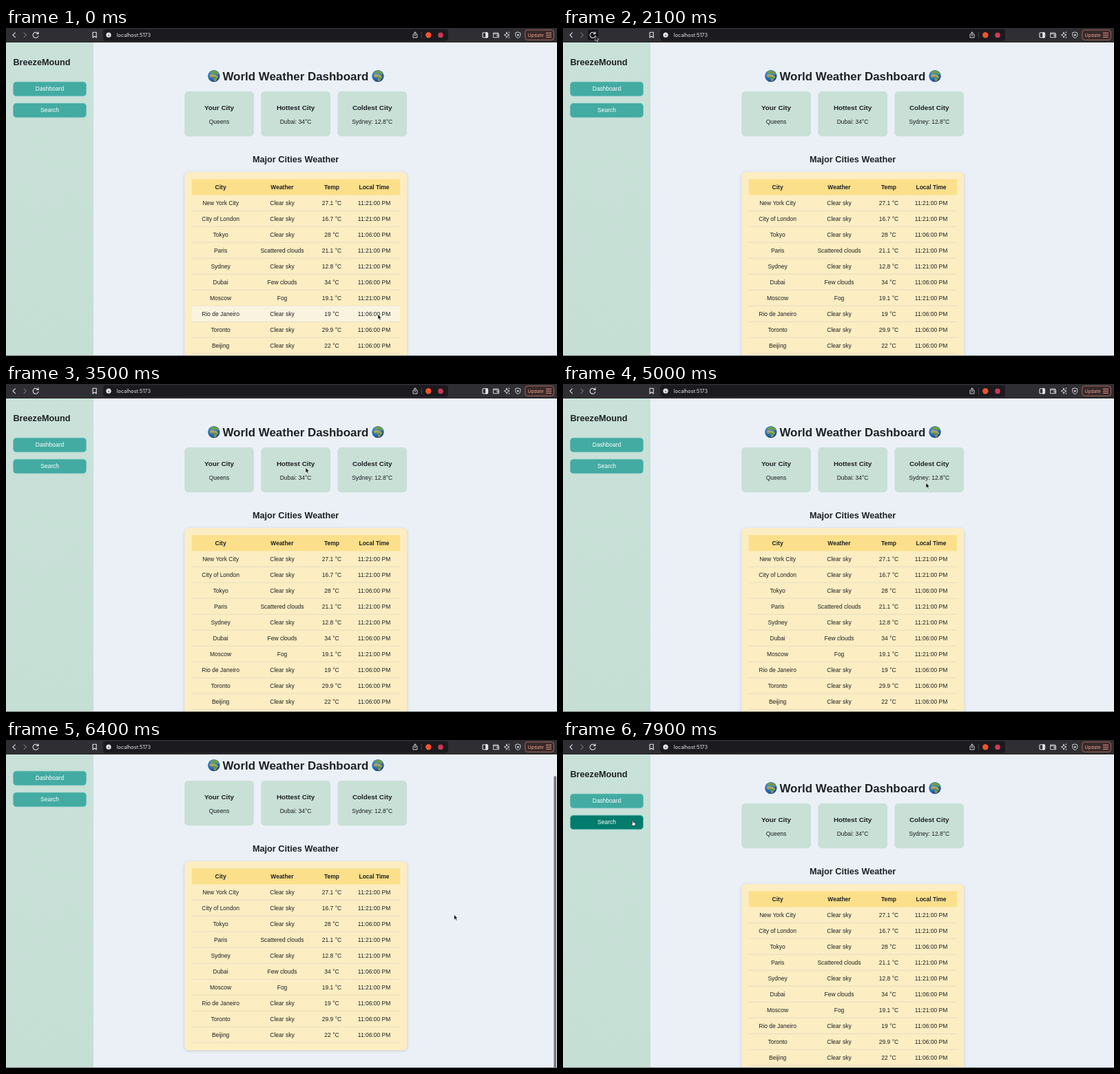
An HTML page for the animation above (8 s loop, 800 by 476 pixels).

```html
<!DOCTYPE html>
<html lang="en">
<head>
<meta charset="utf-8">
<title>Weather dashboard</title>
<style>
  html, body { margin: 0; width: 100%; height: 100%; overflow: hidden; background: #ebf0f7; }
  svg { display: block; width: 800px; height: 476px; }
  text { font-family: "Liberation Sans", Arial, sans-serif; font-size: 8.47px; fill: #1d2124; }
  .mid { text-anchor: middle; }
  .bold { font-weight: 700; }
  .h1 { font-size: 16.93px; }
  .h2 { font-size: 12.7px; }
  .h3 { font-size: 9.9px; }
  .white { fill: #fff; }
  .ui { font-family: Inter, sans-serif; font-size: 7.3px; fill: #e6e6e8; }
  .card { fill: #c8e0d6; }
  .button { fill: #43aba2; }
  .button.hover { fill: #047c6d; }
  .row { fill: none; }
  .row.hover { fill: #faf3df; }
  .icon { fill: none; stroke: #e4e4e7; stroke-width: 1.1; stroke-linecap: round; stroke-linejoin: round; }
  .soft { filter: drop-shadow(0 1px 2px rgba(60, 70, 80, .22)); }
</style>
</head>
<body>
<svg viewBox="0 0 800 476">
  <defs>
    <linearGradient id="side" x1="0" y1="0" x2="0" y2="1">
      <stop offset="0" stop-color="#c9e1d8"/>
      <stop offset="1" stop-color="#c6dfd5"/>
    </linearGradient>
    <radialGradient id="sea" cx=".4" cy=".3" r=".75">
      <stop offset="0" stop-color="#4f9bdc"/>
      <stop offset=".65" stop-color="#2768ae"/>
      <stop offset="1" stop-color="#173b73"/>
    </radialGradient>
    <g id="globe">
      <circle r="8.7" fill="url(#sea)"/>
      <path fill="#6d9b4b" d="M-4.8-5.6-2-7.6 2.5-7.9 6-5.8 7.6-2.8 5.8-2.2 3.4-3.4 1.4-2.6-.4-3.8-2.4-2.8-4.6-3Z"/>
      <path fill="#b5a65a" d="M-5.4-1.9-2.2-2.4.8-1.4 3.6-1.5 5 1 6.6 1.3 4.4 3.6 3.6 6 1.8 7.6.4 6.6-.2 3.4-1.4 2.2-4.2 2.2-6 .4Z"/>
      <path fill="#5f9143" d="M-4.4 1.2 0 .7 4.4 1.8 3.6 4.6 1.6 6.2.2 4 -1 2.2-4 2.2Z"/>
    </g>
  </defs>

  <rect width="800" height="476" fill="#ebf0f7"/>
  <rect y="21" width="127" height="455" fill="url(#side)"/>

  <g id="page">
    <text class="bold h2" x="10.4" y="54">BreezeMound</text>
    <text class="bold h1 mid" x="420.4" y="76">World Weather Dashboard</text>
    <use href="#globe" x="301.8" y="69.6"/>
    <use href="#globe" x="540" y="69.6"/>
    <text class="bold h2 mid" x="420.6" y="195.4">Major Cities Weather</text>
    <rect class="soft" x="259.2" y="209" width="323" height="274.3" rx="6.5" fill="#fcedc2"/>
    <rect x="269.7" y="219.4" width="302.3" height="23" fill="#fcdf8a"/>
  </g>

  <rect id="thumb" x="795.4" width="3.6" height="424" rx="1.8" fill="#77797d"/>
  <rect y="475" width="800" height="1" fill="#6d7274"/>

  <rect width="800" height="21" fill="#2f2e33"/>
  <rect y="20.2" width="800" height=".8" fill="#242328"/>
  <rect x="141" y="1.8" width="501" height="17" rx="4" fill="#1b1a1f"/>
  <rect id="reloadBg" x="36" y="2.6" width="15" height="15" rx="3" fill="#151418"/>
  <g class="icon">
    <path d="M13.4 6.8 10 10.2 13.4 13.6"/>
    <path stroke="#737278" d="M26 6.8 29.4 10.2 26 13.6"/>
    <path d="M46.5 8.1A4 4 0 1 0 47 11.3M47 5.8V8.5H44.2"/>
    <path d="M126 6.2H131.2V14L128.6 11.9 126 14Z"/>
    <path d="M592.5 9H591V14H597V9H595.5M594 11.6V6M592.3 7.5 594 5.8 595.7 7.5" stroke-width=".9"/>
    <path d="M603.3 6V14.5" stroke="#55545a" stroke-width=".8"/>
    <rect x="692" y="6.7" width="7.6" height="7" rx="1"/>
    <path d="M697.7 7.2V13.2" stroke-width="3"/>
    <path d="M708 7H714.5V8.5H715.6V13.7H708ZM708 8.6H714.5M715.6 10.2H713V12H715.6" stroke-width=".9"/>
    <path d="M727 6.2 728.1 9 731 10.2 728.1 11.4 727 14.2 725.9 11.4 723.2 10.2 725.9 9ZM730.3 5.7V7.4M730.4 13V14.5" stroke-width=".9"/>
    <path d="M743.3 6 746.8 7.1V10.2C746.8 12.4 745.2 13.8 743.3 14.6 741.4 13.8 739.8 12.4 739.8 10.2V7.1Z" stroke-width=".9"/>
    <path d="M743.3 9V11.5M742 10.2H744.6" stroke-width="1"/>
  </g>
  <circle cx="149" cy="10.2" r="3.6" fill="#e6e6e8"/>
  <path d="M149 9.8V12M149 8.2V8.5" stroke="#1b1a1f" stroke-width="1"/>
  <text class="ui" x="160.8" y="12.8">localhost:5173</text>
  <circle cx="613.3" cy="10.2" r="4.2" fill="#f0532d"/>
  <circle cx="631" cy="10.4" r="3.8" fill="#c73a55"/>
  <rect x="753.8" y="2.9" width="41.6" height="14.4" rx="3.5" fill="#37292a" stroke="#b9705f" stroke-width=".9"/>
  <text class="ui" x="757.4" y="12.7" style="font-size:6.8px;fill:#f2a08e">Update</text>
  <path d="M784 7.2H792M784 10.2H792M784 13.2H792" stroke="#f2a08e" stroke-width="1"/>

  <g id="cursor">
    <path id="arrow" d="M0 0V7.3L1.7 5.8 2.9 8.5 4.2 7.9 3 5.3H5.2Z" fill="#000" stroke="#fff" stroke-width=".6"/>
    <path id="hand" d="M-.9 0Q0-.8.7 0L1.1 2.6 3.8 3.2Q4.6 3.6 4.3 5L3.6 7.4H.2L-1.9 4.8Q-2.1 3.9-1.1 4.1L-.4 4.6Z" fill="#fff" stroke="#111" stroke-width=".7"/>
  </g>
</svg>
<script>
const $ = id => document.getElementById(id);
const page = $("page");

function add(tag, attrs, text) {
  const el = document.createElementNS("http://www.w3.org/2000/svg", tag);
  for (const k in attrs) el.setAttribute(k, attrs[k]);
  if (text) el.textContent = text;
  return page.appendChild(el);
}
const label = (text, x, y, cls = "") => add("text", { x, y, class: "mid " + cls }, text);

const buttons = ["Dashboard", "Search"].map((name, i) => {
  const y = 78.2 + 31 * i;
  const el = add("rect", { x: 10.5, y, width: 106, height: 20.6, rx: 4.5, class: "button", stroke: "#69c3c0", "stroke-width": .6 });
  label(name, 63.5, y + 13.1, "white");
  return { el, x: 10, y, w: 107, h: 21 };
});

[["Your City", "Queens"], ["Hottest City", "Dubai: 34°C"], ["Coldest City", "Sydney: 12.8°C"]].forEach(([title, value], i) => {
  const x = 259.2 + 111.1 * i;
  add("rect", { x, y: 92, width: 100.7, height: 65.2, rx: 5.5, class: "card" });
  label(title, x + 50.3, 118.9, "bold h3");
  label(value, x + 50.3, 138.7);
});

const columns = [311.6, 401, 473, 534.5];
const writeRow = (cells, y, cls) => cells.forEach((c, i) => label(c, columns[i], y, cls));
writeRow(["City", "Weather", "Temp", "Local Time"], 233.7, "bold");

const rows = [
  ["New York City", "Clear sky", 27.1, 21],
  ["City of London", "Clear sky", 16.7, 21],
  ["Tokyo", "Clear sky", 28, 6],
  ["Paris", "Scattered clouds", 21.1, 21],
  ["Sydney", "Clear sky", 12.8, 21],
  ["Dubai", "Few clouds", 34, 6],
  ["Moscow", "Fog", 19.1, 21],
  ["Rio de Janeiro", "Clear sky", 19, 6],
  ["Toronto", "Clear sky", 29.9, 6],
  ["Beijing", "Clear sky", 22, 6]
].map(([city, sky, temp, min], i) => {
  const y = 242.4 + 23 * i;
  const el = add("rect", { x: 269.7, y, width: 302.3, height: 23, class: "row" });
  add("rect", { x: 269.7, y: y + 22.4, width: 302.3, height: .7, fill: "#dcd7c4" });
  writeRow([city, sky, temp + " °C", `11:${String(min).padStart(2, "0")}:00 PM`], y + 14.3);
  return { el, x: 269, y, w: 303, h: 23 };
});

// [time, value...] keys
const pointer = [
  [0, 540, 415.5], [500, 540, 415.5], [1700, 46.8, 11.5], [2400, 46.8, 11.5],
  [3000, 312, 128], [3500, 435, 121.5], [4200, 436, 128], [4800, 527, 143.5],
  [5100, 527, 143.5], [5500, 654, 253.5], [6300, 654, 253.5], [6600, 641, 253.5],
  [7100, 641, 253.5], [7700, 101, 117]
];
const scrolling = [[5400, 0], [5700, 33], [6500, 33], [6800, 11], [7000, 0]];
const barFade = [[5400, 0], [5500, 1], [7300, 1], [7600, 0]];

function sample(keys, t) {
  const i = keys.findIndex(k => k[0] > t);
  if (i < 0) return keys[keys.length - 1].slice(1);
  if (!i) return keys[0].slice(1);
  const a = keys[i - 1], b = keys[i];
  const u = (t - a[0]) / (b[0] - a[0]), e = u * u * (3 - 2 * u);
  return a.slice(1).map((v, j) => v + (b[j + 1] - v) * e);
}

const LOOP = 8000, STEP = 100;
const inside = (r, x, y) => x >= r.x && x < r.x + r.w && y >= r.y && y < r.y + r.h;
const show = (el, on) => el.setAttribute("opacity", +on);

function draw(now) {
  const t = Math.floor(now % LOOP / STEP) * STEP;
  const [x, y] = sample(pointer, t);
  const [scroll] = sample(scrolling, t);
  let onButton = false;

  page.setAttribute("transform", `translate(0 ${-scroll})`);
  $("thumb").setAttribute("y", 21.8 + scroll * .92);
  show($("thumb"), sample(barFade, t)[0]);

  for (const r of rows) r.el.classList.toggle("hover", y > 21 && inside(r, x, y + scroll));
  for (const b of buttons) {
    const over = y > 21 && inside(b, x, y + scroll);
    b.el.classList.toggle("hover", over);
    onButton = onButton || over;
  }
  show($("reloadBg"), x > 36 && x < 51 && y < 18);
  show($("arrow"), !onButton);
  show($("hand"), onButton);
  $("cursor").setAttribute("transform", `translate(${x} ${y})`);
}

const start = performance.now();
function tick() {
  draw(performance.now() - start);
  requestAnimationFrame(tick);
}
tick();
</script>
</body>
</html>
```
